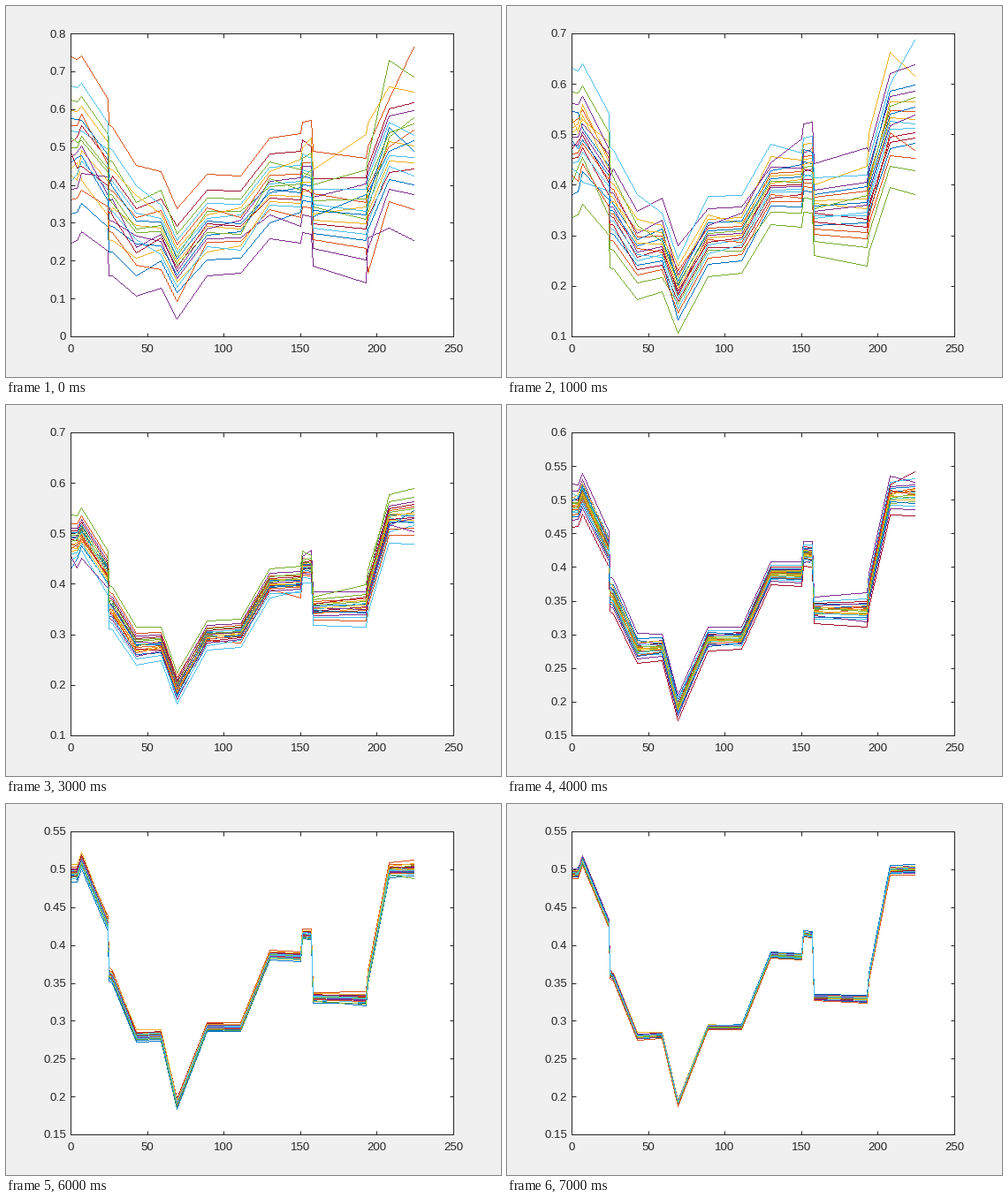
Write a matplotlib script that moves like this. It is 560x420 px and loops after 8000 ms.

```python
import numpy as np
import matplotlib.pyplot as plt
from matplotlib.animation import FuncAnimation
from matplotlib.ticker import FormatStrFormatter, MultipleLocator

W, H, DPI = 560, 420, 100
PX = 72 / DPI  # one pixel in points
LEFT, TOP, AX_W, AX_H = 73, 31, 433, 343
INK = "#262626"
COLORS = ["#0072BD", "#D95319", "#EDB120", "#7E2F8E",
          "#77AC30", "#4DBEEE", "#A2142F"]
COUNT, GENERATIONS = 20, 8

plt.rcParams["font.family"] = "Liberation Sans"

# Profile that the population settles on
X = np.array([0, 4, 7, 24, 25, 27, 43, 59, 69, 89,
              111, 130, 150, 151, 157, 158, 193, 194, 208, 224])
BASE = np.array([.494, .494, .511, .427, .361, .357, .279, .280, .190, .291,
                 .291, .386, .384, .414, .413, .330, .328, .357, .498, .499])


def y_range(gen):
    """Lower limit, upper limit and tick step of the y axis."""
    if gen == 0:
        return 0, .8, .1
    if gen < 4:
        return .1, .7, .1
    return .15, .6 if gen == 4 else .55, .05


def population(gen):
    """Curves that swap ranks along x while their spread shrinks."""
    rng = np.random.default_rng(40 + gen)
    steps = rng.normal(size=(COUNT, len(X)))
    steps[:, 1:] *= .05 * np.sqrt(np.diff(X))
    rank = steps.cumsum(axis=1).argsort(axis=0).argsort(axis=0)

    # Bell-shaped spacing: dense centre, loose edges at -1 and 1
    u = (rank + .5) / COUNT
    place = np.log(u / (1 - u)) / np.log(2 * COUNT - 1)

    # The band is narrowest halfway and tilts in the early generations
    spread = .235 * .6 ** gen * (.55 + .5 * ((X - 110) / 110) ** 2)
    tilt = .035 * np.exp(-((gen - 2) / 1.5) ** 2) * (X - 60) / 110
    return BASE + tilt + spread * place


def trace(x, y):
    """Pixels of a polyline, one per step along the longer direction."""
    x, y = np.rint(x), np.rint(y)
    parts = []
    for x0, y0, x1, y1 in zip(x, y, x[1:], y[1:]):
        n = int(max(abs(x1 - x0), abs(y1 - y0))) + 1
        parts.append(np.linspace((x0, y0), (x1, y1), n))
    return np.rint(np.concatenate(parts)).T


fig = plt.figure(figsize=(W / DPI, H / DPI), dpi=DPI, facecolor="#F0F0F0")
ax = fig.add_axes([LEFT / W, 1 - (TOP + AX_H) / H, AX_W / W, AX_H / H])
ax.set_xlim(0, 250)
ax.xaxis.set_major_locator(MultipleLocator(50))
ax.yaxis.set_major_formatter(FormatStrFormatter("%g"))
ax.tick_params(direction="in", top=True, right=True, length=4.5 * PX,
               width=PX, color=INK, labelcolor=INK, labelsize=13.3 * PX)
ax.tick_params(axis="x", pad=9.3 * PX)
ax.tick_params(axis="y", pad=4.8 * PX)
for spine in ax.spines.values():
    spine.set(linewidth=PX, edgecolor=INK, antialiased=False)

# Single-pixel markers keep the curves thin and hard-edged
lines = [ax.plot([], [], ",", color=COLORS[i % len(COLORS)])[0]
         for i in range(COUNT)]


def update(gen):
    low, high, step = y_range(gen)
    ax.set_ylim(low, high)
    ax.set_yticks(np.round(np.arange(low, high + step / 2, step), 2))
    sx, sy = AX_W / 250, AX_H / (high - low)
    for line, curve in zip(lines, population(gen)):
        px, py = trace(X * sx, (curve - low) * sy)
        line.set_data(px / sx, low + py / sy)
    return lines


anim = FuncAnimation(fig, update, frames=GENERATIONS, interval=1000,
                     repeat=True, repeat_delay=0, blit=False)
plt.show()
```
